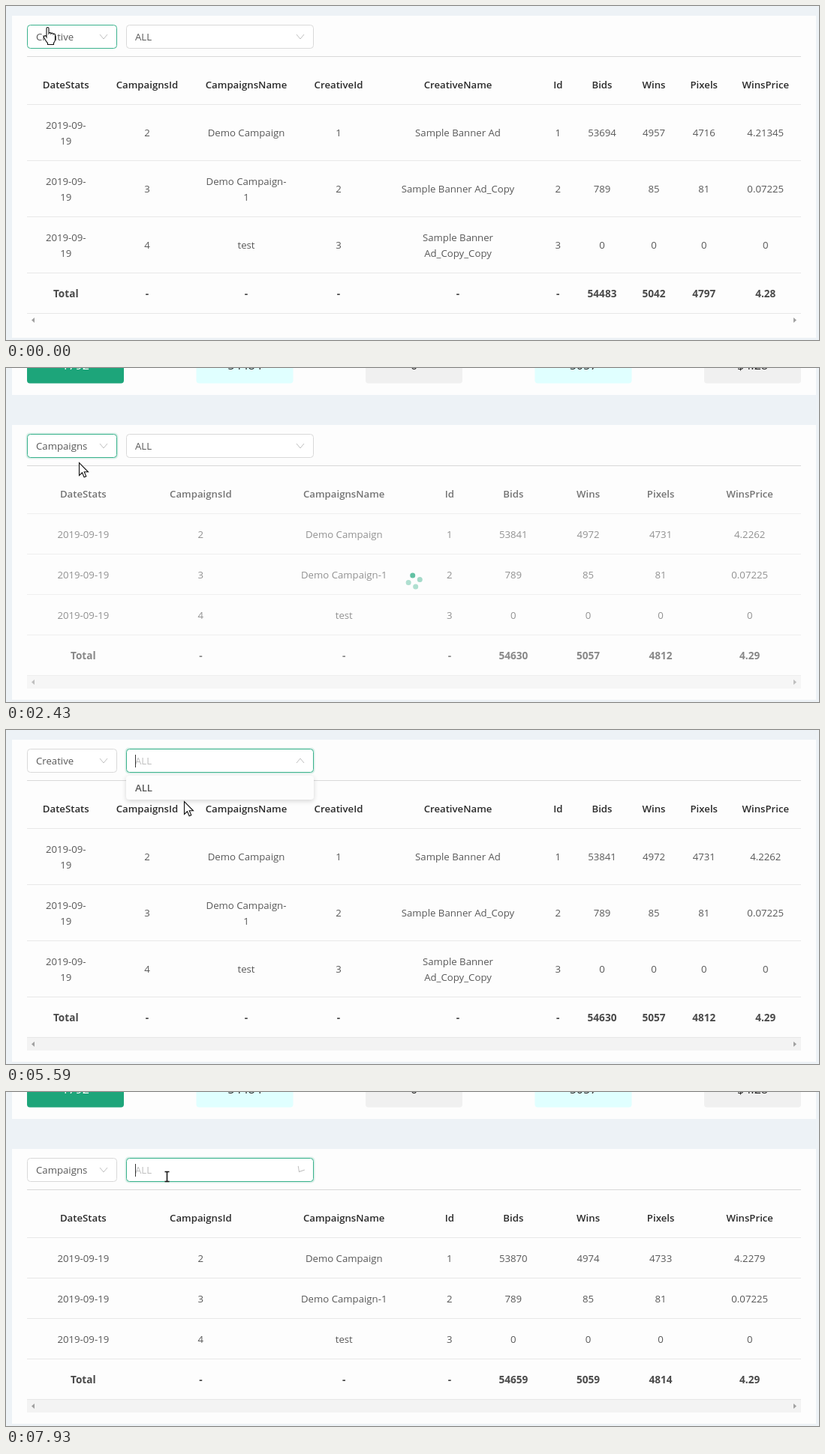
Write an HTML page with a canvas that moves like this. It is 1083x446 px and loops after 8 s.

```html
<!DOCTYPE html>
<html lang="en">
<head>
<meta charset="utf-8">
<title>Campaign statistics</title>
<style>
html, body { margin: 0; width: 100%; height: 100%; overflow: hidden; background: #edf2f6; }
canvas { display: block; }
</style>
</head>
<body>
<canvas id="stage" width="1083" height="446"></canvas>
<script>
const c = document.getElementById('stage').getContext('2d');
const LOOP = 8000, MOVE = 400, FADE = 300, SCROLL = 63;
const LEFT = 28, WIDTH = 1031;
const GREEN = '#1da57a', INK = '#595959';

// Pointer stops: arrival time and place
const item = i => [95, 68 + 32 * i];
const stops = [
  [0, 55, 28], [1160, ...item(0)], [1580, 98, 130], [2700, 95, 114], [3750, 96, item(1)[1] + SCROLL],
  [4390, 178, 139], [5180, 215, 44], [5590, 237, 95], [6150, 90, 42], [6580, 94, 99],
  [6850, ...item(2)], [7780, 214, 112]];

// Spans of time in which a menu is open or data is loading
const menu1 = [[270, 1785], [3400, 3900], [6150, 7120]];
const menu2 = [[5250, 5870], [7880, 9000]];
const loads = [[1785, 2280], [3900, 4390], [7120, 7400]];

const clamp = v => Math.max(0, Math.min(1, v));
const ease = u => u * u * (3 - 2 * u);
const between = (t, a, b) => t >= a && t < b;
const inside = (p, x, y, w, h) => between(p.x, x, x + w) && between(p.y, y, y + h);
const fade = (t, spans) => Math.max(...spans.map(([a, b]) =>
  clamp((t - a) / FADE) - clamp((t - b) / FADE)));

const columns = [
  ['DateStats', 103.5], ['CampaignsId', 113], ['CampaignsName', 151], ['CreativeId', 95],
  ['CreativeName', 223], ['Id', 43.5], ['Bids', 74], ['Wins', 64], ['Pixels', 69.5], ['WinsPrice', 94.5]
].map(([name, width], index) => ({ name, width, index }));
const campaigns = ['Demo Campaign', 'Demo Campaign-1', 'test'];
const creatives = ['Sample Banner Ad', 'Sample Banner Ad_Copy', 'Sample Banner|Ad_Copy_Copy'];
const counts = [[53694, 4957, 4716, 4.21345], [53841, 4972, 4731, 4.2262], [53870, 4974, 4733, 4.2279]];
const second = [789, 85, 81, 0.07225];

function text(s, x, y, { weight = 400, size = 13.2, color = INK, align = 'center' } = {}) {
  c.font = `${weight} ${size}px "Open Sans", "Noto Sans", sans-serif`;
  c.fillStyle = color;
  c.textAlign = align;
  const parts = String(s).split('|');
  parts.forEach((p, i) => c.fillText(p, x, y + 5 + (i - (parts.length - 1) / 2) * 21));
}

function rect(x, y, w, h, color) {
  c.fillStyle = color;
  c.fillRect(x, y, w, h);
}

function round(x, y, w, h, r, fill, stroke) {
  c.beginPath();
  c.roundRect(x, y, w, h, r);
  c.fillStyle = fill;
  c.fill();
  if (!stroke) return;
  c.strokeStyle = stroke;
  c.lineWidth = 1;
  c.stroke();
}

function drawCards(dy) {
  rect(0, 0, 1083, 446, '#edf2f6');
  rect(8, 13 + dy, 1071, 430 - dy, '#fdfdfd');
  if (!dy) return;
  rect(8, 0, 1071, 36, '#fdfdfd');
  ['1792', '54484', '0', '5057', '$4.28'].forEach((label, i) => {
    const x = LEFT + i * 225.5;
    round(x, -40, 129, 60.5, 4, i ? i % 2 ? '#e0ffff' : '#f0f0f0' : GREEN);
    text(label, x + 64.5, -3, { size: 16, color: i ? '#262626' : '#fff' });
  });
}

function tableRows(data, wide) {
  const cents = v => Math.floor(v * 100);
  const total = data.map((v, i) => i < 3 ? v + second[i] : (cents(v) + cents(second[i])) / 100);
  const wrap = s => wide ? s.replace(/-(\d+)$/, '-|$1') : s;
  const body = [data, second, [0, 0, 0, 0]].map((tail, i) =>
    [wrap('2019-09-19'), i + 2, wrap(campaigns[i]), i + 1, creatives[i], i + 1, ...tail]);
  return [columns.map(col => col.name), ...body, ['Total', ...Array(5).fill('-'), ...total]];
}

function drawTable(dy, data, dim, track) {
  const wide = !dy, rowHeight = wide ? 75 : 54;
  const shown = columns.filter(col => wide || !col.name.startsWith('Creative'));
  const scale = WIDTH / shown.reduce((sum, col) => sum + col.width, 0);

  rect(LEFT, 67 + dy, WIDTH, 1, '#d9d9d9');
  c.globalAlpha = 1 - 0.7 * dim;
  tableRows(data, wide).forEach((row, r) => {
    const line = r < 4 ? 356 - (3 - r) * rowHeight : 410;
    const height = r % 4 ? rowHeight : 54;
    const style = r === 0 ? { weight: 600, color: '#2b2b2b' }
      : r === 4 ? { weight: 700, size: 13.6, color: '#4a4a4a' } : {};
    rect(LEFT, line, WIDTH, 1, '#e8e8e8');
    let x = LEFT;
    for (const col of shown) {
      const w = col.width * scale;
      text(row[col.index], x + w / 2, line - Math.floor((height - 1) / 2), style);
      x += w;
    }
  });
  if (track) rect(LEFT, 411, WIDTH, 17, '#f3f3f3');
  for (const [x, d] of [[34, 4], [1053, -4]]) {
    c.beginPath();
    c.moveTo(x, 419.5);
    c.lineTo(x + d, 416);
    c.lineTo(x + d, 423);
    c.fillStyle = '#a0a0a0';
    c.fill();
  }
  c.globalAlpha = 1;
}

function drawSpin(t, y, dim) {
  const turn = (t - 1580) / 1200 * 2 * Math.PI;
  for (let i = 0; i < 4; i++) {
    const a = turn + i * Math.PI / 2;
    const glow = 0.35 + 0.35 * Math.max(0, Math.cos((t - 4390) / 320 - i * 1.6));
    c.globalAlpha = glow * Math.min(1, dim * 3);
    c.beginPath();
    c.arc(543.7 + 7.8 * Math.cos(a), y + 7.8 * Math.sin(a), 3.5, 0, 7);
    c.fillStyle = GREEN;
    c.fill();
  }
  c.globalAlpha = 1;
}

function drawSelect(x, y, w, label, { focus, hover, flip, search }) {
  if (focus) round(x - 1.5, y - 1.5, w + 3, 35, 5, 'rgba(29,165,122,.15)');
  round(x + 0.5, y + 0.5, w - 1, 31, 4, '#fff', focus || hover ? '#3bb28d' : '#d9d9d9');
  text(label, x + 12, y + 16, { align: 'left', color: search ? '#bfbfbf' : INK });
  if (search) rect(x + 12, y + 8, 1, 17, '#333');
  c.save();
  c.translate(x + w - 18, y + 16);
  c.rotate(flip * Math.PI);
  c.beginPath();
  c.moveTo(-5, -3);
  c.lineTo(0, 3);
  c.lineTo(5, -3);
  c.strokeStyle = '#bfbfbf';
  c.stroke();
  c.restore();
}

function drawMenu(x, y, w, items, value, flip, points) {
  const alpha = clamp(flip * 2 - 0.5);
  if (!alpha) return;
  c.save();
  c.globalAlpha = alpha;
  c.shadowColor = 'rgba(0,0,0,.16)';
  c.shadowBlur = 6;
  c.shadowOffsetY = 2;
  round(x, y, w, items.length * 32, 4, '#fdfdfd');
  c.shadowColor = 'transparent';
  c.clip();
  items.forEach((name, i) => {
    const top = y + i * 32, on = name === value;
    const lit = on || points.some(p => inside(p, x, top, w, 32));
    if (lit && items.length > 1) rect(x, top, w, 32, '#e6eeea');
    text(name, x + 12, top + 16, { align: 'left', weight: on ? 600 : 400 });
  });
  c.restore();
}

const hand = new Path2D('M-1.5 13V1.5a1.5 1.5 0 0 1 3 0V8a1.6 1.6 0 0 1 3 .5a1.6 1.6 0 0 1 3 .7a1.4 1.4 0 0 1 2.5 1V16q0 3-2 5v2H0v-2q-2-2-5-7.5a1.7 1.7 0 0 1 3-1.5z');
const arrow = new Path2D('M0 0V17l4-3.7 2.6 6 2.7-1.2-2.6-5.8h5.3z');
const beam = new Path2D('M-3-6h6M0-6v13M-3 7h6');

function drawPointer(p, shape) {
  c.save();
  c.translate(Math.round(p.x) + 0.5, Math.round(p.y) + 0.5);
  c.lineWidth = shape === beam ? 1.5 : 1.1;
  c.strokeStyle = '#111';
  c.fillStyle = '#fff';
  if (shape !== beam) c.fill(shape);
  c.stroke(shape);
  c.restore();
}

function pointerAt(t) {
  const next = stops.findIndex(s => s[0] > t);
  const i = next < 0 ? stops.length - 1 : Math.max(1, next);
  const [t0, x0, y0] = stops[i - 1], [t1, x1, y1] = stops[i];
  const start = Math.max(t0, t1 - MOVE);
  const u = ease(clamp((t - start) / (t1 - start)));
  return { x: x0 + (x1 - x0) * u, y: y0 + (y1 - y0) * u };
}

function draw(now) {
  const t = now % LOOP;
  const dy = between(t, 2280, 4390) || t >= 7400 ? SCROLL : 0;
  const value = between(t, 1800, 3900) || t >= 7120 ? 'Campaigns' : 'Creative';
  const data = counts[t < 2280 ? 0 : t < 7400 ? 1 : 2];
  const p = pointerAt(t), points = [p, pointerAt(t - 200)];
  const flip1 = fade(t, menu1), flip2 = fade(t, menu2), dim = fade(t, loads);
  const y = 25 + dy, menuY = y + 36;
  const over1 = inside(p, 28, y, 120, 32), over2 = inside(p, 160, y, 250, 32);
  const focus2 = between(t, 5250, 6150) || t >= 7880;

  drawCards(dy);
  drawTable(dy, data, dim, t >= 1860 && dim < 0.9);
  if (dim > 0) drawSpin(t, 253 + dy / 2, dim);
  drawSelect(28, y, 120, value, { focus: t >= 270 && !focus2, hover: over1, flip: flip1 });
  drawSelect(160, y, 250, 'ALL', { focus: focus2, hover: over2, flip: flip2, search: flip2 > 0 });
  drawMenu(28, menuY, 120, ['ALL', 'Creative', 'Campaigns'], value, flip1, points);
  drawMenu(160, menuY, 250, ['ALL'], 'ALL', flip2, points);

  const onMenu = flip1 > 0.3 && inside(p, 28, menuY, 120, 96) || flip2 > 0.3 && inside(p, 160, menuY, 250, 32);
  drawPointer(p, over1 || onMenu ? hand : over2 ? beam : arrow);
  requestAnimationFrame(draw);
}
requestAnimationFrame(draw);
</script>
</body>
</html>
```
